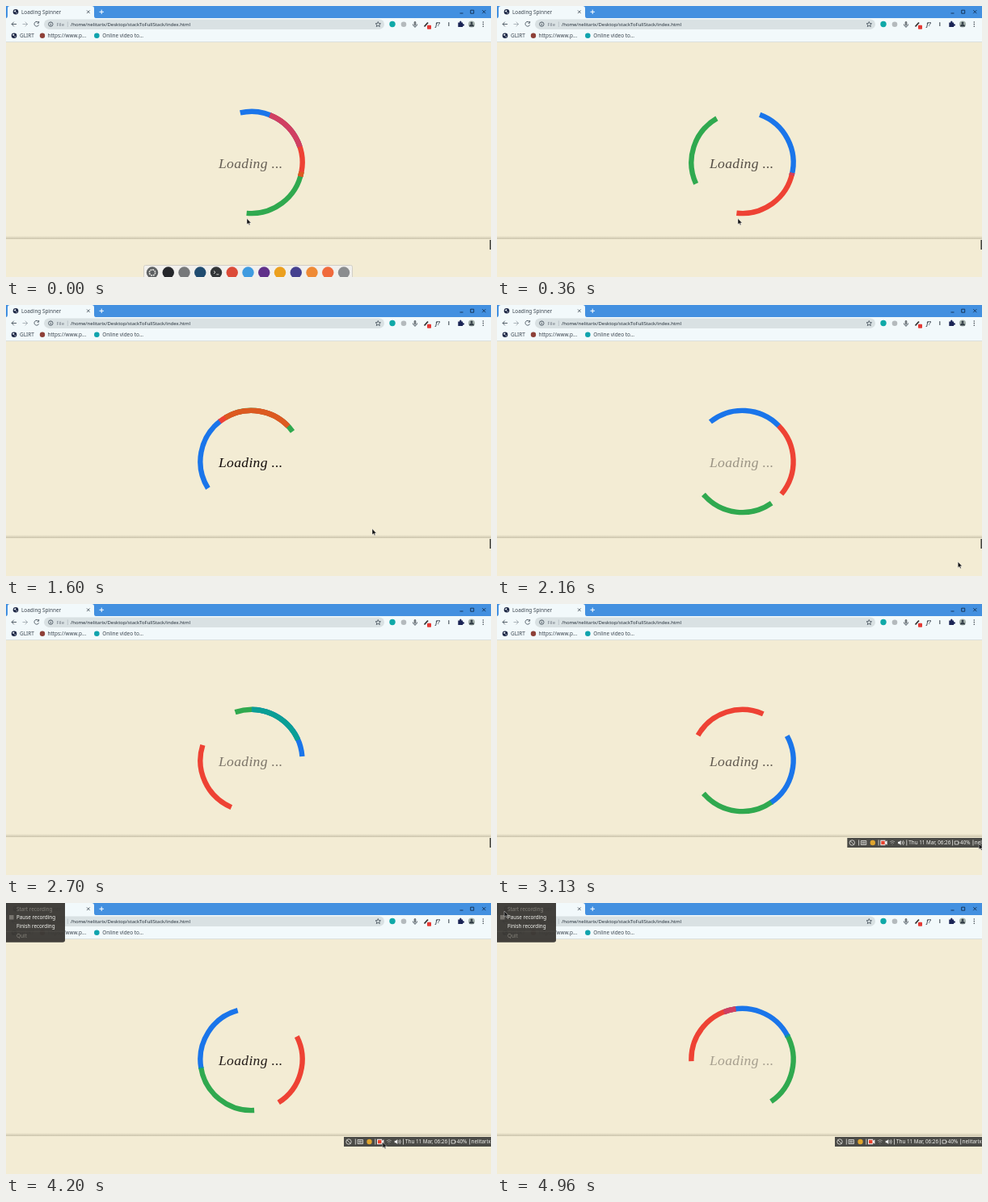
An HTML page for the animation above (5 s loop, 600 px wide and 336 px high).

```html
<!DOCTYPE html>
<html lang="en">
<head>
<meta charset="utf-8">
<title>Loading Spinner</title>
<style>
  html, body { margin: 0; width: 100%; height: 100%; overflow: hidden; background: #f3ecd4; }
  svg { display: block; width: 600px; height: 336px; }
  text { font: 6.4px "Noto Sans", sans-serif; fill: #3c4650; white-space: pre; }
  #label { font: italic 17.6px "Liberation Serif", serif; letter-spacing: .3px; fill: #140d0b; }
  .url { font-size: 5.95px; }
  .light text { font-size: 6.3px; fill: #f4f4f0; }
  .light .dim { fill: #85827b; }
  .line { fill: none; stroke: #56616b; stroke-width: 1; }
  .white { fill: none; stroke: #e6e6e2; stroke-width: .8; }
</style>
</head>
<body>
<svg viewBox="0 0 600 336">
  <defs>
    <linearGradient id="shade" x2="0" y2="1">
      <stop offset="0" stop-color="#6b644e" stop-opacity="0"/>
      <stop offset="1" stop-color="#6b644e" stop-opacity=".3"/>
    </linearGradient>
    <g id="globe">
      <circle r="3.3" fill="#1d2745"/>
      <path d="M-2.4-.9L-.4-2.2.6-.8-.8.4zM.2 1L2 .6 1.2 2.2z" fill="#e8eef4"/>
    </g>
  </defs>
  <rect width="600" height="336" fill="#f3ecd4"/>
  <rect y="285" width="600" height="4" fill="url(#shade)"/>

  <!-- browser frame -->
  <rect width="600" height="15" fill="#4390e0"/>
  <path d="M0 15Q2 15 2 12V3Q2 0 5 0H106Q109 0 109 3V12Q109 15 111 15Z" fill="#f2f9fb"/>
  <rect y="15" width="600" height="29.5" fill="#f2f9fb"/>
  <rect y="44" width="600" height=".7" fill="#d2d8dc"/>
  <use href="#globe" x="12" y="7.3"/>
  <text x="19" y="9.6">Loading Spinner</text>
  <path class="line" d="M100 5.5l3.6 3.6m0-3.6l-3.6 3.6"/>
  <path d="M115.5 7.3h5.4m-2.7-2.7v5.4" stroke="#fff" fill="none"/>
  <path d="M561.5 9h4m9.2-3.8h4v4h-4zM589.3 5.2l4 4m0-4l-4 4" stroke="#17375c" fill="none"/>
  <path class="line" d="M13 22.5H7m2.8-2.8L7 22.5l2.8 2.8"/>
  <path class="line" d="M20.5 22.5h6m-2.8-2.8l2.8 2.8-2.8 2.8" opacity=".45"/>
  <path class="line" d="M40.3 20.6a2.9 2.9 0 1 0 .3 2.8M40.6 19v2.2h-2.2"/>
  <rect x="47" y="16.5" width="421" height="12.4" rx="6.2" fill="#d9e1e3"/>
  <circle class="line" cx="55.3" cy="22.6" r="2.7" stroke-width=".7"/>
  <path class="line" d="M55.3 22.2v2m0-3.6v.7" stroke-width=".7"/>
  <text class="url" x="62.5" y="24.8" style="fill:#737b84">File</text>
  <path d="M76.3 19.5v6.5" stroke="#a9b1b9" stroke-width=".6"/>
  <text class="url" x="80" y="24.8" style="fill:#25303a">/home/nelitarix/Desktop/stackToFullStack/index.html</text>
  <path class="line" stroke-width=".7" d="M460.3 19.5l.9 2.1 2.3.2-1.7 1.5.5 2.3-2-1.2-2 1.2.5-2.3-1.7-1.5 2.3-.2z"/>
  <circle cx="478" cy="22.5" r="3.7" fill="#10a9a8"/>
  <circle cx="492" cy="22.7" r="3.3" fill="#b4babd"/>
  <path d="M504.7 20.3q0-1.3 1.3-1.3t1.3 1.3v2.6q0 1.3-1.3 1.3t-1.3-1.3z" fill="#70777c"/>
  <path class="line" d="M503.4 22.5q0 2.9 2.6 2.9t2.6-2.9M506 25.4v1.4" stroke-width=".8"/>
  <path d="M517.5 25.5l4.5-5" stroke="#333" stroke-width="1.8"/>
  <rect x="521" y="23.8" width="5" height="5" rx=".8" fill="#e53935"/>
  <text x="531.3" y="25" style="font-style:italic;font-weight:bold">f?</text>
  <text x="546.7" y="25" style="font-weight:bold;font-size:7px">i</text>
  <path d="M559.3 20.5h2a1.2 1.2 0 1 1 2 0h1.8v2a1.2 1.2 0 1 1 0 2v1.6h-5.8z" fill="#1a2455"/>
  <circle cx="576" cy="22.5" r="4.1" fill="#a9b5b0"/>
  <path d="M573 25.5a3 3 0 0 1 6 0zM574.5 21a1.5 1.5 0 1 0 3 0 1.5 1.5 0 0 0-3 0" fill="#364149"/>
  <g fill="#424b53"><circle cx="590.3" cy="20" r=".8"/><circle cx="590.3" cy="22.6" r=".8"/><circle cx="590.3" cy="25.2" r=".8"/></g>
  <use href="#globe" x="10" y="36.7"/>
  <text x="17" y="39">GLIRT</text>
  <circle cx="45" cy="36.7" r="3.2" fill="#8e4038"/>
  <text x="51.5" y="39">https://www.p...</text>
  <circle cx="112.3" cy="36.7" r="3.3" fill="#10a3ad"/>
  <text x="119.3" y="39">Online video to...</text>

  <g id="spinner" fill="none" stroke-width="6.4"></g>
  <text id="label" x="263" y="201">Loading ...</text>

  <g id="dock">
    <rect x="170.5" y="321.5" width="258" height="18" rx="2" fill="#f1f0ed" stroke="#c9c7bf" stroke-width=".8"/>
  </g>

  <rect x="598.4" y="290" width="1.6" height="12" fill="#444440"/>
  <g id="panel" class="light">
    <rect x="418" y="290" width="184" height="12" fill="#4b4b47"/>
    <circle class="white" cx="424" cy="296" r="3.2"/>
    <path class="white" d="M421.8 293.8l4.4 4.4M432.3 292.5v7M456.8 292.5v7M491.5 292.5v7M548.3 292.5v7M573.7 292.5v7"/>
    <path class="white" d="M435 293.5h6.5v5H435zM436 295.2h4.5M436 296.8h4.5" stroke-width=".6"/>
    <circle cx="449.5" cy="296" r="3.2" fill="#dfa52f"/>
    <path d="M459 292.8h6.2v2l2.2-1.5v5.5l-2.2-1.5v2H459z" fill="#eee"/>
    <rect x="460" y="293.8" width="4.4" height="4.4" fill="#e8432d"/>
    <path class="white" d="M470.8 294.8q3-2.4 6 0M472 296.5q1.8-1.5 3.6 0M473.8 298.4v.6" opacity=".65"/>
    <path d="M480.7 294.8h1.6l2-1.8v6l-2-1.8h-1.6z" fill="#eee"/>
    <path class="white" d="M485.7 294.2q1.4 1.8 0 3.6M487.2 293.2q2.1 2.8 0 5.6" stroke-width=".6"/>
    <text x="494" y="298.3">Thu 11 Mar, 06:26</text>
    <path class="white" d="M551 294h4.5v4H551zM556.3 295.2v1.6"/>
    <text x="557.8" y="298.3">40%</text>
    <text x="575.5" y="298.3">nelitarix</text>
  </g>

  <g id="menu" class="light">
    <path d="M0 0H73V46Q73 48.7 70 48.7H0Z" fill="#3c3a36" fill-opacity=".97"/>
    <text class="dim" x="13" y="10">Start recording</text>
    <path d="M4 15h5.5v5.5H4z" fill="#77746e"/>
    <text x="13" y="20.2">Pause recording</text>
    <text x="13" y="30.6">Finish recording</text>
    <path d="M0 35.2h73" stroke="#575550" stroke-width=".6"/>
    <text class="dim" x="13" y="43">Quit</text>
  </g>

  <path id="cursor" d="M0 0V7.3L1.7 5.8 2.9 8.3 4 7.8 2.9 5.4H5.2Z" fill="#151515" stroke="#fff" stroke-width=".4"/>
</svg>
<script>
const LOOP = 5000, SPAN = 84.5;
const el = id => document.getElementById(id);
const clamp = v => Math.min(1, Math.max(0, v));
const smooth = v => { v = clamp(v); return v * v * (3 - 2 * v); };
const add = (parent, tag, attrs) => {
  const node = document.createElementNS('http://www.w3.org/2000/svg', tag);
  for (const k in attrs) node.setAttribute(k, attrs[k]);
  return parent.appendChild(node);
};

// cubic-bezier(x1, 0, x2, 1)
const bezier = (x1, x2) => x => {
  let lo = 0, hi = 1, s;
  for (let i = 0; i < 24; i++) {
    s = (lo + hi) / 2;
    const r = 1 - s;
    if (3 * r * r * s * x1 + 3 * r * s * s * x2 + s ** 3 < x) lo = s; else hi = s;
  }
  return 3 * (1 - s) * s * s + s ** 3;
};
const easeIn = bezier(.42, 1), easeInOut = bezier(.42, .58);

const ring = color => add(el('spinner'), 'circle', { cx: 303.5, cy: 194, r: 63.1, pathLength: 360, stroke: color });
const arcs = [
  { color: '#30a94f', period: 1000, phase: .54, ease: easeIn },
  { color: '#1a75ea', period: 2500, phase: .22, ease: easeIn },
  { color: '#ee4234', period: 2000, phase: .275, ease: easeInOut }
];
arcs.forEach(a => a.node = ring(a.color));
const overlaps = [[0, 1, '#0a9f95'], [0, 2, '#dc5a20'], [1, 2, '#d03f62']]
  .map(([a, b, color]) => ({ a: arcs[a], b: arcs[b], node: ring(color) }));

function setArc(node, mid, length) {
  node.style.display = length > 0 ? '' : 'none';
  node.setAttribute('stroke-dasharray', `${Math.max(0, length)} 360`);
  node.setAttribute('transform', `rotate(${mid - 90 - length / 2} 303.5 194)`);
}

function drawSpinner(t) {
  for (const a of arcs) {
    a.mid = 360 * a.ease((a.phase + t / a.period) % 1);
    setArc(a.node, a.mid, SPAN);
  }
  for (const { a, b, node } of overlaps) {
    const gap = (b.mid - a.mid + 540) % 360 - 180;
    setArc(node, a.mid + gap / 2, SPAN - Math.abs(gap));
  }
  const fade = (t + 1300) / 3000 % 1;
  el('label').style.opacity = Math.min(1, .28 + .78 * fade);
}

['#5d6062', '#25272b', '#77797a', '#204c70', '#333638', '#dc4b38', '#3f9be0',
 '#60318a', '#eba01f', '#45418f', '#ef8a35', '#f06a3c', '#8b8d8f'].forEach((color, i) =>
  add(el('dock'), 'circle', { cx: 181 + 19.75 * i, cy: 330.5, r: 7.2, fill: color }));
// gear and terminal prompt
add(el('dock'), 'circle', { cx: 181, cy: 330.5, r: 3.6, fill: 'none', stroke: '#e4e4e0', 'stroke-width': 1.6, 'stroke-dasharray': '1.9 .9' });
add(el('dock'), 'path', { d: 'M257 328.5l2 1.7-2 1.7M260.3 332.8h3', fill: 'none', stroke: '#e4e4e0', 'stroke-width': .9 });

// time, x, y
const path = [[0, 298, 263.5], [1080, 298, 263.5], [1600, 453, 277.5], [2050, 560, 316], [2400, 603, 326],
  [2950, 603, 297], [3150, 596, 297], [3600, 470, 291.5], [4000, 466, 296.5], [4330, 466, 296.5],
  [4900, 9, 10], [5000, 9, 10]];

function drawCursor(t) {
  const i = path.findIndex(p => p[0] > t);
  const [t0, x0, y0] = path[i - 1], [t1, x1, y1] = path[i];
  const k = smooth((t - t0) / (t1 - t0));
  el('cursor').setAttribute('transform', `translate(${x0 + (x1 - x0) * k} ${y0 + (y1 - y0) * k})`);
}

const start = performance.now();
function draw() {
  const t = (performance.now() - start) % LOOP;
  // the page itself refreshes 15 times a second
  drawSpinner(Math.max(33, Math.floor(t * .015 + .05) / .015));
  drawCursor(t);
  el('dock').setAttribute('transform', `translate(0 ${18 * smooth((t - 80) / 330)})`);
  el('panel').setAttribute('transform', `translate(${184 * (1 - smooth((t - 2950) / 220))} 0)`);
  el('menu').style.display = t >= 4130 ? '' : 'none';
  requestAnimationFrame(draw);
}
draw();
</script>
</body>
</html>
```
